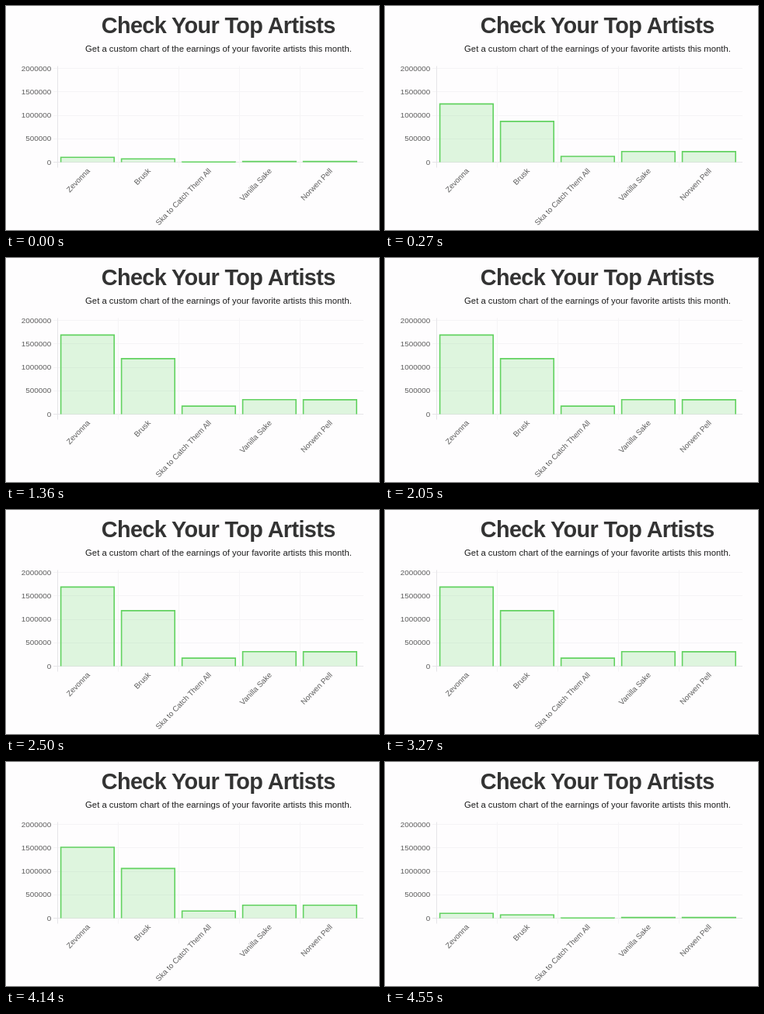
Recreate the animation shown at these times as an HTML page. Size 480 px wide and 289 px high, loop 4.6 s.

```html
<!DOCTYPE html>
<html lang="en">
<head>
<meta charset="utf-8">
<title>Top Artists</title>
<style>
  html, body { margin: 0; width: 100%; height: 100%; overflow: hidden; background: #fefdfe; }
  svg { display: block; width: 480px; height: 289px; font-family: "Liberation Sans", Arial, sans-serif; }
  .title { font-size: 28.8px; font-weight: 700; letter-spacing: -.6px; fill: #333; }
  .sub { font-size: 11.3px; fill: #1c1c1c; }
  .tick { font-size: 9.9px; fill: #5c5c5c; text-anchor: end; }
  .grid { stroke: #f5f4f6; }
  .axis { stroke: #e6e5e8; }
  .fill { fill: #5fd35f; fill-opacity: .2; }
  .edge { fill: none; stroke: #62d260; stroke-width: 1.6; }
</style>
</head>
<body>
<svg id="stage" viewBox="0 0 480 289">
  <text class="title" x="273.2" y="34.6" text-anchor="middle">Check Your Top Artists</text>
  <text class="sub" x="273.5" y="59.4" text-anchor="middle">Get a custom chart of the earnings of your favorite artists this month.</text>
</svg>
<script>
const stage = document.getElementById('stage');
const LEFT = 66, RIGHT = 460, TOP = 80.5, BASE = 201.5, SLOT = 78, BAR = 68.6;
const MAX = 2000000, LOOP = 4600, FPS = 22, REFRESH = 60, LAST = 100;
const artists = [
  ['Zevonna', 1695000],
  ['Brusk', 1190000],
  ['Ska to Catch Them All', 178000],
  ['Vanilla Sake', 317000],
  ['Norwen Pell', 315000]
];

function add(tag, attrs, text) {
  const el = document.createElementNS('http://www.w3.org/2000/svg', tag);
  for (const key in attrs) el.setAttribute(key, attrs[key]);
  if (text) el.textContent = text;
  return stage.appendChild(el);
}

const line = (x1, y1, x2, y2, cls) => add('line', { x1, y1, x2, y2, class: cls });

for (let i = 0; i <= 4; i++) {
  const y = BASE - i * (BASE - TOP) / 4;
  line(LEFT - 5, Math.floor(y) + .5, RIGHT, Math.floor(y) + .5, i ? 'grid' : 'axis');
  add('text', { class: 'tick', x: 58.3, y: y + 3 }, String(i * MAX / 4));
}
for (let i = 0; i < 5; i++) {
  const x = LEFT + i * SLOT + .5;
  line(x, TOP - 3, x, BASE + 7, i ? 'grid' : 'axis');
}

const bars = artists.map(([name, value], i) => {
  const mid = LEFT + (i + .5) * SLOT;
  add('text', {
    class: 'tick', y: 3.3,
    transform: `translate(${mid + 1.2} 211) rotate(-46)`
  }, name);
  return {
    x: mid - BAR / 2 - .1,
    height: value / MAX * (BASE - TOP),
    fill: add('path', { class: 'fill' }),
    edge: add('path', { class: 'edge' })
  };
});

// Frame start times are rounded to 10 ms.
const stamp = k => Math.round(k * 100 / FPS) * 10;

function frameAt(t) {
  let k = Math.min(LAST, Math.floor(t * FPS / 1000) + 1);
  while (stamp(k) > t) k--;
  return k;
}

// Bars rise with a quartic ease-out in screen-refresh steps, hold, then run backwards.
function draw(t) {
  const k = frameAt(t);
  const step = Math.floor(Math.min(k, LAST - k) * REFRESH / FPS + 1.5);
  const p = Math.min(1, step / REFRESH);
  const grow = 1 - (1 - p) ** 4;
  for (const bar of bars) {
    const y = Math.min(BASE, BASE - bar.height * grow + .4).toFixed(2);
    const d = `M${bar.x} ${BASE}V${y}h${BAR}V${BASE}`;
    bar.fill.setAttribute('d', d);
    bar.edge.setAttribute('d', d);
  }
}

const start = performance.now();
function tick() {
  draw((performance.now() - start) % LOOP);
  requestAnimationFrame(tick);
}
draw(0);
requestAnimationFrame(tick);
</script>
</body>
</html>
```
